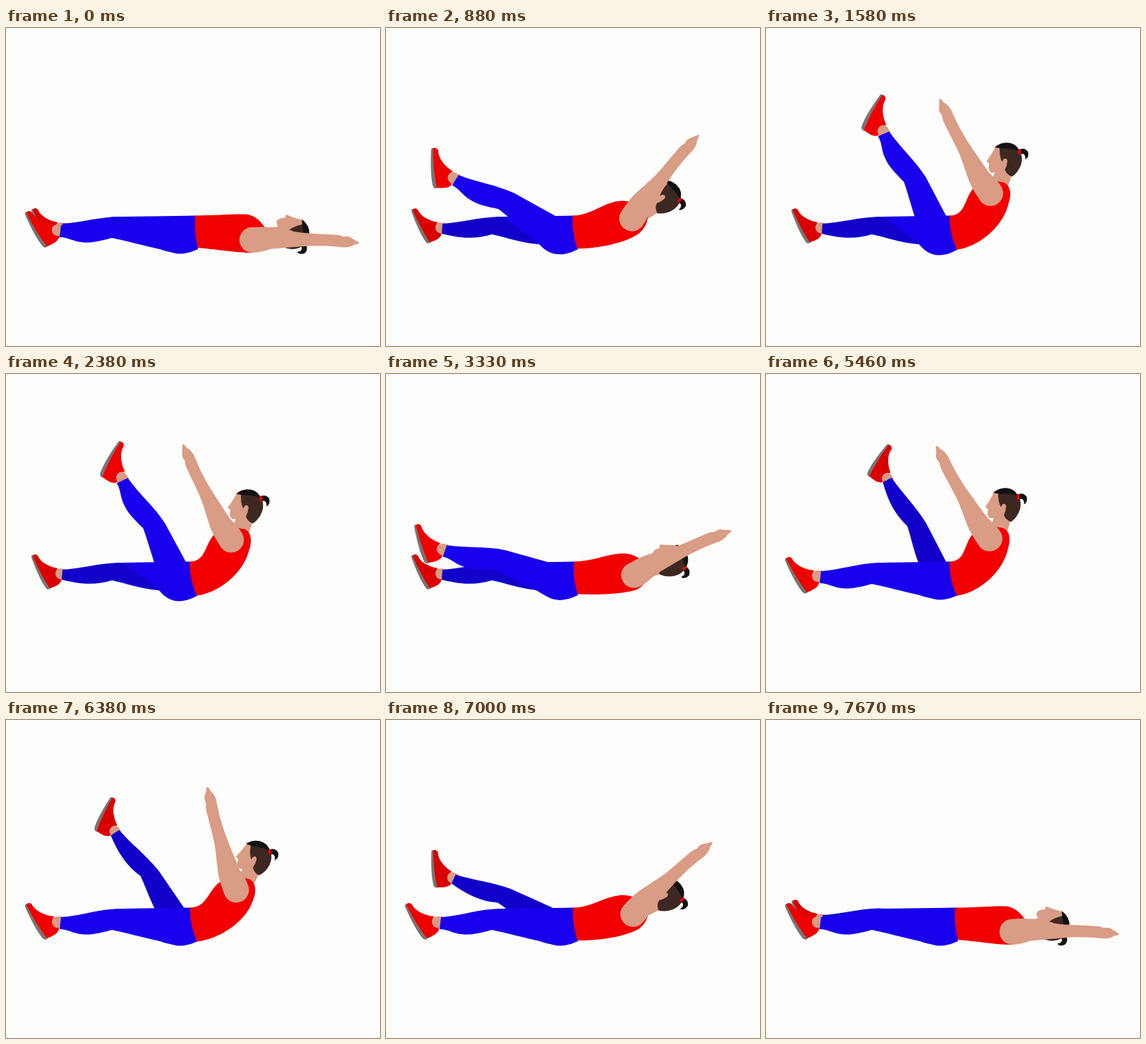
Animation of 530x450 px, one loop 7710 ms. Source, as an HTML page:

```html
<!DOCTYPE html>
<html lang="en">
<head>
<meta charset="utf-8">
<title>Alternating leg V-up</title>
<style>
  html, body { margin: 0; width: 100%; height: 100%; overflow: hidden; background: #fdfdfc; }
  svg { display: block; width: 530px; height: 450px; --pants: #1900ec; --shoe: #ee0000; }
  #farLeg { --pants: #1200ca; --shoe: #da0000; }
  .skin { fill: #d99c84; }
  .pants { fill: var(--pants); }
  .shoe { fill: var(--shoe); }
  .sole { fill: #777572; }
  .red { fill: #f20000; }
  .brown { fill: #3d2822; }
  .black { fill: #121213; }
  #neck { stroke: #d99c84; stroke-width: 24; }
</style>
</head>
<body>
<svg viewBox="0 0 530 450">
  <defs>
    <g id="foot">
      <path class="sole" d="M27 264Q26 260 31 260L47 290L60 308Q56 313 52 309Q41 296 27 264Z"/>
      <path class="shoe" d="M29 262Q30 257 36 260Q40 268 50 273Q58 277 68 278Q64 286 68 291L75 293Q76 298 70 303Q64 307 58 309Q42 288 29 262Z"/>
      <path class="skin" d="M80 278L72 278Q65 279 65 286Q66 293 72 294L78 295Z"/>
    </g>
  </defs>

  <g id="farLeg">
    <use href="#foot" transform="translate(39 257) rotate(3.8) scale(.93) translate(-30 -261)"/>
    <path class="pants" d="M80 277C108 275 130 268 160 267L225 270Q255 276 258 297L240 312L216 306C190 304 170 296 150 292C130 298 110 299 79 291Z"/>
  </g>
  <g id="nearLeg">
    <use href="#foot"/>
    <path class="pants" d="M78 279C106 277 130 268 160 267L225 270Q262 276 262 297Q258 318 240 318Q228 317 218 313C195 308 170 301 150 297C135 301 120 305 107 303C95 302 88 296 76 296Z"/>
  </g>
  <path id="pelvis" class="pants"/>
  <line id="neck"/>

  <g id="head">
    <path class="skin" d="M-14 -20L-21 -8L-28 2L-24 5L-25 10Q-25 16 -21 18Q-15 18 -10 17L8 23L18 1L10 -19Z"/>
    <path class="brown" d="M-9 -18Q-10 -6 -6 3L1 7L-2 14Q0 21 8 24Q17 18 21 7Q24 -3 20 -11L13 -20Z"/>
    <path class="black" d="M-16 -18Q-5 -27 8 -23Q16 -20 19 -12Q8 -16 -2 -16Q-10 -16 -16 -18Z"/>
    <ellipse class="skin" cx="-1" cy="4" rx="3.6" ry="5.4" transform="rotate(18)"/>
    <path class="black" d="M18 -14Q26 -18 31 -11Q33 -3 27 0Q28 -6 24 -8Q21 -8 18 -7Z"/>
    <ellipse class="red" cx="19" cy="-11" rx="2" ry="4"/>
  </g>

  <path id="torso" class="red"/>
  <path id="arm" class="skin" d="M0 -18Q14 -19 26 -18C47 -15 62 -10 82 -9L116 -7Q124 -7 130 -4Q138 -6 143 -1L152 4Q151 7 145 7Q140 11 130 11C112 9 100 8 77 9Q47 11 26 13Q12 18 0 18A17.7 18 0 0 1 0 -18Z"/>
</svg>

<script>
const LOOP = 7710;
const REP = LOOP / 2;   // one sit-up; the legs take turns
const DELAY = 42;       // the first rise starts here

const part = id => document.getElementById(id);
const [nearLeg, farLeg, pelvis, neck, head, torso, arm] =
  ['nearLeg', 'farLeg', 'pelvis', 'neck', 'head', 'torso', 'arm'].map(part);

const add = ([x, y], [dx, dy]) => [x + dx, y + dy];
const polar = (r, deg) => {
  const a = deg * Math.PI / 180;
  return [r * Math.cos(a), r * Math.sin(a)];
};
const place = (el, [x, y], deg) =>
  el.setAttribute('transform', `translate(${x} ${y}) rotate(${deg})`);
const swing = (el, deg) => el.setAttribute('transform', `rotate(${deg} 242 297)`);

// Hip seam, then chest, collar, shoulder blade and back, all following the lean p
function torsoPath(p, shoulder, hip, tail) {
  const chest = add(shoulder, polar(38 - 16 * p, -107 - 53 * p));
  const collar = add(shoulder, [20, -15]);
  const blade = add(shoulder, polar(18 + 13 * p, 87 - 60 * p));
  const slope = -50 * p * p;
  const middle = [(collar[0] + blade[0]) / 2, (collar[1] + blade[1]) / 2];
  return `M${hip}` +
    `C${add(hip, [25, 0])} ${add(chest, polar(-22, slope))} ${chest}` +
    `Q${add(chest, polar(18, slope))} ${collar}` +
    `Q${add(middle, polar(13, 40 - 85 * p))} ${blade}` +
    `C${add(blade, polar(15 + 17 * p, 176 - 80 * p))} ${add(tail, [33, 3 - 8 * p])} ${tail}` +
    `Q${[266 - 7 * p, 289]} ${hip}Z`;
}

function draw(time) {
  const t = (time - DELAY + LOOP) % LOOP;
  const p = (1 - Math.cos(2 * Math.PI * t / REP)) / 2;   // 0 lying, 1 sitting
  const near = t < REP ? p : 0;
  const far = p - near;

  swing(nearLeg, 66 * near);
  swing(farLeg, 65.5 * far);

  const hip = [268 - 9 * p, 265.5];
  const tail = [272 - 2 * p, 311 + 3 * p];
  const shoulder = [348.5 + 26 * p - 66 * p * p, 300 - 77.5 * p + 5 * p * p];
  const skull = add(shoulder, polar(58 - 6 * p, -9 - 62 * p));

  torso.setAttribute('d', torsoPath(p, shoulder, hip, tail));
  pelvis.setAttribute('d',
    `M214 302Q236 ${330 + 5 * near} 272 313L${add(hip, [2, 0])}L165 267Z`);

  const [x1, y1] = add(shoulder, [4 + 7 * p, -4]);
  const [x2, y2] = add(skull, polar(14, 172 - 80 * p));
  Object.entries({ x1, y1, x2, y2 }).forEach(([k, v]) => neck.setAttribute(k, v));

  place(head, skull, 76 - 85 * p);
  place(arm, shoulder, -133 * p);
}

function tick() {
  draw(performance.now() % LOOP);
  requestAnimationFrame(tick);
}
tick();
</script>
</body>
</html>
```
